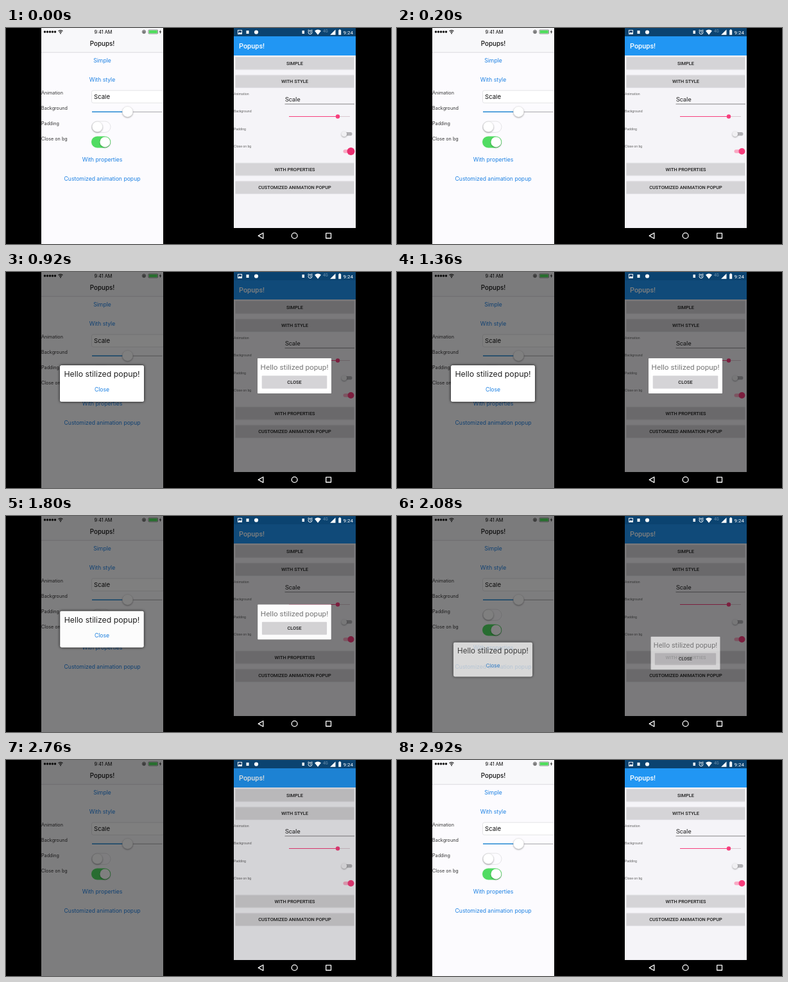
Animation of 600 by 338 pixels, one loop 2.96 s. Source, as an HTML page:

```html
<!DOCTYPE html>
<html lang="en">
<head>
<meta charset="utf-8">
<title>Popup animation on two phones</title>
<style>
  html, body { margin: 0; width: 100%; height: 100%; overflow: hidden; background: #000; }
  svg { display: block; width: 600px; height: 338px; }
  .ios { font-family: Inter, "Liberation Sans", sans-serif; }
  .droid { font-family: Roboto, "Noto Sans", sans-serif; }
  .mid { text-anchor: middle; }
  .link { font-size: 8.65px; fill: #1c80e3; text-anchor: middle; }
  .label { font-size: 7.2px; fill: #333; }
  .tiny { font-size: 5.2px; fill: #666; }
  .caps { font-size: 7.4px; font-weight: 500; fill: #1d1d1d; text-anchor: middle; }
  .btn { fill: #d5d4d7; stroke: #e3e2e6; stroke-width: 1; }
  .lift { filter: drop-shadow(0 1px 1px rgba(0, 0, 0, .35)); }

  .dim, .popup, .ripple { animation: 2960ms linear infinite both; }
  .ios .dim { animation-name: iosDim; }
  .droid .dim { animation-name: droidDim; }
  .ripple { animation-name: ripple; }
  .popup { --rise: -260px; animation-name: iosPopup; }
  .droid .popup { --rise: -257px; animation-name: droidPopup; }
  .ios .card { filter: drop-shadow(0 .5px 2px rgba(0, 0, 0, .9)); }

  @keyframes iosDim {
    0%, 10.1% { opacity: 0; }
    13.5%, 94.6% { opacity: .5; }
    98%, 100% { opacity: 0; }
  }
  @keyframes droidDim {
    0%, 10.1% { opacity: 0; }
    13.5%, 90.5% { opacity: .5; }
    94.3%, 100% { opacity: 0; }
  }
  @keyframes ripple {
    0% { opacity: 1; }
    6%, 100% { opacity: 0; }
  }
  /* Drop in from the top with a sine-out, leave downwards with a sine-in */
  @keyframes iosPopup {
    0%, 14.66% {
      transform: translateY(var(--rise)) scale(1.2); opacity: 0;
      animation-timing-function: cubic-bezier(.39, .575, .565, 1);
    }
    19.36% { transform: translateY(0) scale(1); opacity: 1; }
    57.84% {
      transform: translateY(0) scale(1); opacity: 1;
      animation-timing-function: cubic-bezier(.47, 0, .745, .715);
    }
    82.4%, 100% { transform: translateY(167px) scale(.8); opacity: 0; }
  }
  @keyframes droidPopup {
    0%, 15.14% {
      transform: translateY(var(--rise)) scale(1.2); opacity: 0;
      animation-timing-function: cubic-bezier(.39, .575, .565, 1);
    }
    19.83% { transform: translateY(0) scale(1); opacity: 1; }
    57.5% {
      transform: translateY(0) scale(1); opacity: 1;
      animation-timing-function: cubic-bezier(.47, 0, .745, .715);
    }
    82.4%, 100% { transform: translateY(169px) scale(.8); opacity: 0; }
  }
</style>
</head>
<body>
<svg viewBox="0 0 600 338" xmlns="http://www.w3.org/2000/svg">
  <defs>
    <clipPath id="left"><rect x="55" width="190" height="338"/></clipPath>
    <clipPath id="right"><rect x="355" width="190" height="338"/></clipPath>
  </defs>
  <rect width="600" height="338"/>

  <g class="ios" clip-path="url(#left)">
    <rect x="55" width="190" height="338" fill="#fcfbfe"/>
    <rect x="55" width="190" height="38" fill="#f8f8fa"/>
    <path d="M55 38.2H245" stroke="#c4c4c8" stroke-width=".6"/>

    <!-- Status bar -->
    <path d="M60.5 6h17" stroke="#111" stroke-width="3.5" stroke-linecap="round" stroke-dasharray="0 4"/>
    <g fill="none" stroke="#111" stroke-width="1.1">
      <path d="M81.6 5a4.8 4.8 0 0 1 6.8 0M83.1 6.8a2.8 2.8 0 0 1 3.8 0"/>
      <circle cx="215" cy="6" r="2.5" stroke-width=".8"/>
      <rect x="222" y="3" width="14.6" height="6" rx="1" stroke="#444" stroke-width=".6"/>
    </g>
    <circle cx="85" cy="8.4" r=".9" fill="#111"/>
    <rect x="214" y="5.3" width="2" height="1.8" fill="#111"/>
    <rect x="222.8" y="3.7" width="13" height="4.6" fill="#4fdd5c"/>
    <path d="M241 2.5l-2.2 4h1.6l-.7 3.2 2.4-4.2h-1.6z" fill="#111"/>
    <text class="mid" x="151.5" y="8.6" font-size="7.3">9:41 AM</text>
    <text class="mid" x="150" y="28.3" font-size="9.8" font-weight="500" fill="#111">Popups!</text>

    <text class="link" x="150" y="54.2">Simple</text>
    <text class="link" x="150" y="84.2">With style</text>
    <text class="link" x="150" y="209">With properties</text>
    <text class="link" x="150" y="239">Customized animation popup</text>
    <text class="label" x="55" y="104.3">Animation</text>
    <text class="label" x="55" y="128.3">Background</text>
    <text class="label" x="55" y="152.3">Padding</text>
    <text class="label" x="55" y="176.3">Close on bg</text>

    <rect x="133.5" y="97.8" width="113" height="19.4" rx="2.5" fill="#fff" stroke="#d9d9dc" stroke-width=".7"/>
    <text x="137" y="111" font-size="9.6" fill="#111">Scale</text>

    <path d="M134 131.3H189" stroke="#2387d2" stroke-width="1.4"/>
    <path d="M189 131.3H243.5" stroke="#b5b5b8" stroke-width="1.2"/>
    <circle class="lift" cx="189.5" cy="131" r="8.2" fill="#fff" stroke="#ddd" stroke-width=".4"/>
    <rect x="133.4" y="146" width="29.6" height="17.4" rx="8.7" fill="#fdfcff" stroke="#dedee0" stroke-width=".8"/>
    <circle class="lift" cx="142.4" cy="154.5" r="8" fill="#fff" stroke="#ddd" stroke-width=".4"/>
    <rect x="133" y="169.4" width="30.2" height="18" rx="9" fill="#51dc62"/>
    <circle class="lift" cx="154.4" cy="178.4" r="8" fill="#fff"/>

    <rect class="dim" x="55" width="190" height="338"/>
    <g transform="translate(149.5 174.5)">
      <g class="popup">
        <rect class="card" x="-65.5" y="-28.5" width="131" height="57" rx="2.5" fill="#fff"/>
        <text class="mid" y="-10.2" font-size="12.3" fill="#222">Hello stilized popup!</text>
        <text class="link" y="12.7">Close</text>
      </g>
    </g>
  </g>

  <g class="droid" clip-path="url(#right)">
    <rect x="355" width="190" height="338" fill="#f5f4f8"/>
    <rect x="355" y="13" width="190" height="30" fill="#2196f3"/>
    <text x="363" y="32" font-size="10.9" font-weight="500" fill="#fff">Popups!</text>

    <g class="btn">
      <rect x="357.5" y="45.3" width="185" height="19.8" rx="1"/>
      <rect x="357.5" y="73.8" width="185" height="19.8" rx="1"/>
      <rect x="357.5" y="211.2" width="185" height="19.8" rx="1"/>
      <rect x="357.5" y="239.8" width="185" height="19.8" rx="1"/>
    </g>
    <text class="caps" x="450" y="57.8">SIMPLE</text>
    <text class="caps" x="450" y="86.4">WITH STYLE</text>
    <text class="caps" x="450" y="223.8">WITH PROPERTIES</text>
    <text class="caps" x="450" y="252.4">CUSTOMIZED ANIMATION POPUP</text>
    <text class="tiny" x="355" y="105.2">Animation</text>
    <text class="tiny" x="355" y="132.2">Background</text>
    <text class="tiny" x="355" y="159.6">Padding</text>
    <text class="tiny" x="355" y="186.6">Close on bg</text>

    <text x="435" y="115" font-size="9.7" fill="#222">Scale</text>
    <path d="M434.5 119H543" stroke="#777" stroke-width=".9"/>
    <path d="M517 138.5H536" stroke="#d9c8d0" stroke-width="1"/>
    <path d="M441 138.5H517" stroke="#f73d7c" stroke-width="1.2"/>
    <circle cx="517" cy="138.5" r="3.2" fill="#f73d7c"/>
    <rect x="525" y="163" width="14.5" height="5.6" rx="2.8" fill="#b2b1b5"/>
    <circle class="lift" cx="527" cy="165.8" r="4.3" fill="#f0eff2"/>
    <rect x="525.5" y="190.2" width="14.5" height="5.6" rx="2.8" fill="#f9a9c4"/>
    <circle cx="537.5" cy="193" r="5" fill="#f73d7c"/>
    <circle class="ripple" cx="537.5" cy="193" r="6" fill="#ea2f70"/>

    <rect class="dim" x="355" y="13" width="190" height="300"/>

    <!-- Status bar -->
    <rect x="355" width="190" height="13" fill="#0b4370"/>
    <rect x="361.5" y="3.5" width="6" height="6" fill="none" stroke="#fff" stroke-width=".9"/>
    <path d="M362 9l2-2.8 1.3 1.5 1-1.1 1.2 2.4z" fill="#fff"/>
    <g fill="#fff">
      <rect x="374.5" y="4" width="4" height="5"/>
      <circle cx="390" cy="6.5" r="3.1"/>
      <rect x="461.5" y="4" width="3.5" height="5"/>
      <path d="M481 4.4q5-3.8 10 0l-5 6.4zM513.5 2.4v8.4h-8.4z"/>
      <path d="M518.2 3.2h1v-1h2v1h1v7.6h-4z"/>
      <text x="525.6" y="9.6" font-size="8">9:24</text>
    </g>
    <g fill="none" stroke="#fff" stroke-width=".9">
      <circle cx="474" cy="6.7" r="3"/>
      <path d="M474 4.8v2l1.3.8M470.3 4l1.7-1.5M477.7 4l-1.7-1.5"/>
    </g>
    <text x="494" y="7.2" font-size="6.4" fill="#6f93b0">4G</text>

    <!-- Navigation bar -->
    <rect x="355" y="313" width="190" height="25"/>
    <g fill="none" stroke="#fff" stroke-width="1.3" stroke-linejoin="round">
      <path d="M400.8 320.7v8.8l-7.6-4.4z"/>
      <circle cx="449.6" cy="325" r="4.4"/>
      <rect x="498.7" y="321.2" width="7.8" height="7.8"/>
    </g>

    <g transform="translate(449.5 162.5)">
      <g class="popup">
        <rect x="-57.5" y="-27.5" width="115" height="55" rx=".8" fill="#fff"/>
        <text class="mid" y="-9.2" font-size="11.75" fill="#757575">Hello stilized popup!</text>
        <rect x="-50.8" y="-.2" width="101.6" height="20.2" rx="1" fill="#d5d4d7"/>
        <text class="caps" y="12.6">CLOSE</text>
      </g>
    </g>
  </g>
</svg>
</body>
</html>
```
